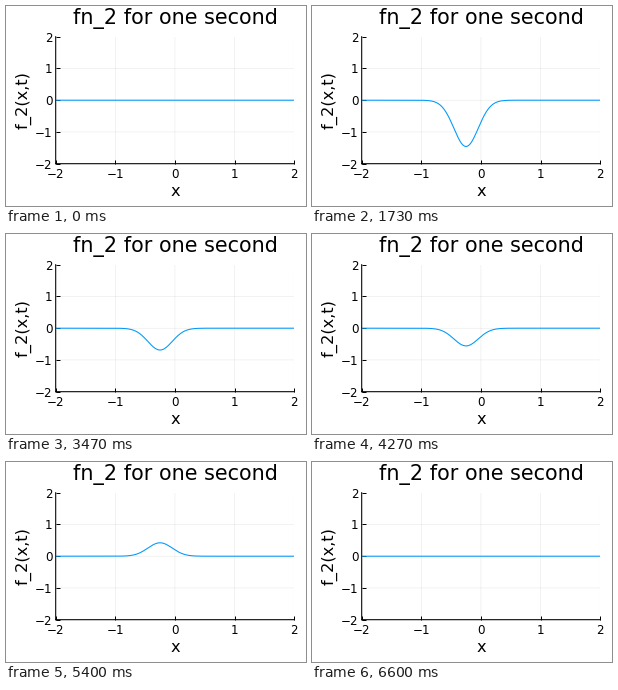
These frames come from a looping animation (300 px wide and 200 px high, 6.67 s). A matplotlib script:

```python
import numpy as np
import matplotlib.pyplot as plt
from matplotlib.animation import FuncAnimation

W, H, DPI = 300, 200, 100
LEFT, RIGHT, TOP, BOTTOM = 49.7, 288.2, 30.7, 157.7
PX = 72 / DPI         # points per pixel
FONT = 1.067          # text scale
TICK_MS, TICKS = 23, 290
STEPS, FPS = 100, 15  # the curve moves in 100 steps, 15 a second

plt.rcParams["font.family"] = "DejaVu Sans"


def wave(x, t):
    """Gaussian bump that swings through three cycles per second."""
    return 1.5 * np.sin(6 * np.pi * t) * np.exp(-12 * (x + 0.25) ** 2)


fig = plt.figure(figsize=(W / DPI, H / DPI), dpi=DPI, facecolor="white")
ax = fig.add_axes([LEFT / W, 1 - BOTTOM / H,
                   (RIGHT - LEFT) / W, (BOTTOM - TOP) / H])
ax.set(xlim=(-2, 2), ylim=(-2, 2),
       xticks=range(-2, 3), yticks=range(-2, 3))
ax.spines[["top", "right"]].set_visible(False)
ax.spines[["left", "bottom"]].set_linewidth(1.07 * PX)
ax.tick_params(direction="in", length=4 * PX, width=PX, labelsize=8 * FONT)
ax.tick_params(axis="x", pad=3.1)
ax.tick_params(axis="y", pad=2.1)
ax.grid(color="black", alpha=0.1, linewidth=0.5 * PX)
ax.set_axisbelow(True)


def label(x, y, text, size, **kw):
    fig.text(x / W, 1 - y / H, text, size=size * FONT, ha="center", **kw)


MID = (LEFT + RIGHT) / 2
label(MID, 18, "fn_2 for one second", 14, va="baseline")
label(MID, 190, "x", 11, va="baseline")
label(17.3, 93.7, "f_2(x,t)", 11, va="center", rotation=90)

xs = np.linspace(-2, 2, 401)
line, = ax.plot(xs, wave(xs, 0), color="#009afa", linewidth=1.07 * PX)

# Keep lines at their exact sub-pixel places
for part in [line, *ax.spines.values(), *ax.get_xgridlines(),
             *ax.get_ygridlines(), *ax.get_xticklines(), *ax.get_yticklines()]:
    part.set_snap(False)


def update(i):
    # A step begins in the tick that holds its start time
    step = min(int((i * TICK_MS + 25) * FPS / 1000), STEPS - 1)
    line.set_ydata(wave(xs, step / (STEPS - 1)))
    return line,


anim = FuncAnimation(fig, update, frames=TICKS, interval=TICK_MS,
                     repeat=True, repeat_delay=0)
plt.show()
```
